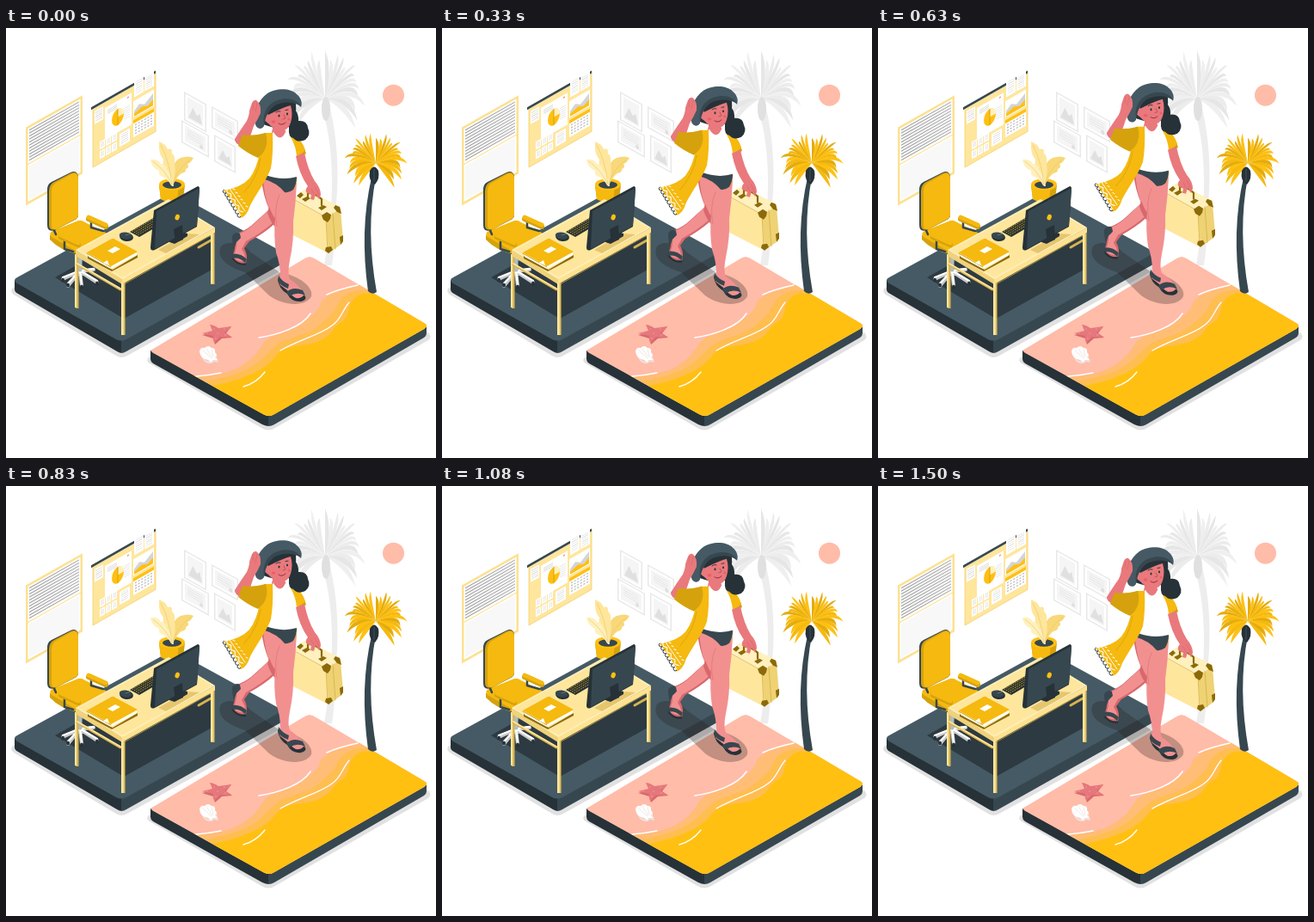
Animation, 500 px wide and 500 px high, one loop 1.54 s. Source, as an HTML page with a canvas:

```html
<!DOCTYPE html>
<html lang="en">
<head>
<meta charset="utf-8">
<title>From the office to the beach</title>
<style>
html, body { margin: 0; width: 100%; height: 100%; overflow: hidden; background: #fff; }
canvas { display: block; width: 500px; height: 500px; }
</style>
</head>
<body>
<canvas id="stage"></canvas>
<script>
const LOOP = 1540, LIFT = 8, SIZE = 500;
const GOLD = '#ffc012', AMBER = '#f5b90f', DEEP = '#d5a20d', PALE = '#ffe69d', CREAM = '#fff0bd', BROWN = '#8b6a0b';
const INK = '#263238', SLATE = '#37474f', STEEL = '#455a64', PEACH = '#ffbca8';
const SKIN = '#e9797c', LEG = '#f29090', SHADE = '#d8686d';

const ratio = window.devicePixelRatio || 1;
const stage = document.getElementById('stage');
const backdrop = document.createElement('canvas');
for (const c of [stage, backdrop]) c.width = c.height = SIZE * ratio;
let g = backdrop.getContext('2d');
g.scale(ratio, ratio);

const fill = (color, d) => { g.fillStyle = color; g.fill(new Path2D(d)); };
const line = (color, width, d) => {
  g.strokeStyle = color;
  g.lineWidth = width;
  g.lineCap = g.lineJoin = 'round';
  g.stroke(new Path2D(d));
};
const oval = (color, x, y, rx, ry = rx, turn = 0) => {
  g.fillStyle = color;
  g.beginPath();
  g.ellipse(x, y, rx, ry, turn, 0, Math.PI * 2);
  g.fill();
};
const box = (color, x, y, w, h) => { g.fillStyle = color; g.fillRect(x, y, w, h); };

// Draws flat artwork on a wall that slants in isometric view.
function onWall(x, y, slope, draw) {
  g.save();
  g.transform(1, slope, 0, 1, x, y);
  draw();
  g.restore();
}

function rows(color, x, y, w, count, gap, h = .6) {
  for (let i = 0; i < count; i++) box(color, x, y + i * gap, w, h);
}

// Arching fronds: each one leaves the crown upwards and bends over to its tip.
function palm(cx, cy, rx, ry, count, tones, from, to) {
  for (let i = 0; i < count; i++) {
    const k = (i * 7 % count) / (count - 1);
    const a = (from + (to - from) * k) * Math.PI / 180;
    const reach = .9 + .12 * Math.sin(i * 5.3);
    const c = Math.cos(a), s = Math.sin(a), side = c < 0 ? -1 : 1;
    const tx = cx + c * rx * reach, ty = cy + s * ry * reach;
    const mx = cx + c * rx * .8, my = cy + s * ry * .6 - Math.abs(c) * ry * .42;
    const w = rx * .2 * side;
    fill(tones[i % tones.length],
      `M${cx} ${cy}Q${mx} ${my} ${tx} ${ty}Q${mx - s * w - c * rx * .12} ${my + c * w} ${cx} ${cy}Z`);
  }
}

function planner() {
  onWall(23, 115.5, -.565, () => {
    box('#fce191', 0, 0, 66, 91);
    box('#fff', 2.5, 3, 61, 85);
    box('#f7f7f7', 4, 5, 58, 36);
    rows('#8f8f8f', 4, 5, 58, 11, 3.5, .9);
    box('#fce191', 2, 44, 62, 1.2);
    box('#f8f8f8', 4, 47, 58, 39);
  });
}

function board() {
  onWall(101, 94, -.57, () => {
    box(PALE, 0, 0, 73, 68);
    line('#f4d06a', .7, 'M0 0V68H73V0');
    box(SLATE, -2, -3, 75, 3.2);
    box('#fff', 2, 4, 10, 15);
    rows('#c6c6c6', 3, 6, 8, 5, 2.4);
    box('#fff', 14, 7, 31, 37);
    rows('#cfcfcf', 17, 11, 11, 3, 2);
    rows('#cfcfcf', 36, 20, 7, 6, 2.5);
    oval(GOLD, 29, 26, 7, 9.5);
    fill(CREAM, 'M29 26L29 16Q36 17 36 26Z');
    line(DEEP, 1, 'M29 17V35');
    box('#fff', 48, -6, 11, 20);
    box('#fff', 60, -5, 11, 19);
    rows('#d2d2d2', 50, -3, 7, 6, 2.6);
    rows('#d2d2d2', 62, -1, 7, 6, 2.4);
    box('#fff', 47, 18, 24, 19);
    fill('#d4d4d4', 'M48 36V30L54 25 60 29 70 22V36Z');
    fill(GOLD, 'M48 36V33L57 30 64 33 70 29V36Z');
    box('#fff', 47, 40, 24, 20);
    box(GOLD, 47, 40, 24, 4);
    for (let i = 0; i < 24; i++) box('#bdbdbd', 49 + i % 6 * 3.6, 46 + (i / 6 | 0) * 3.3, 2, 1.4);
    box('#fff', 31, 47, 12, 15);
    rows('#cfcfcf', 33, 49, 8, 5, 2.4);
    for (let i = 0; i < 6; i++) {
      const x = 8 + i % 3 * 7, y = 43 + (i / 3 | 0) * 11;
      box('#fff', x, y, 6, 9);
      rows('#d6d6d6', x + 1, y + 2, 4, 3, 2);
    }
    oval('#e07b5f', 41, 10, .9);
  });
}

function picture(x, y, w, h, scenic) {
  onWall(x, y, .56, () => {
    box('#e8e8e8', 0, 0, w, h);
    box('#fff', 1.5, 1.5, w - 3, h - 3);
    box('#f5f5f5', 4, 4, w - 8, h - 8);
    if (scenic) fill('#e0e0e0', `M5 ${h - 6}L${w * .4} ${h * .4} ${w * .58} ${h * .6} ${w * .7} ${h * .48} ${w - 5} ${h - 6}Z`);
    else {
      rows('#dedede', 7, 7, w - 14, 4, 2.7);
      oval('#dedede', w * .72, h * .72, 2);
    }
  });
}

function officeFloor() {
  fill('#e1e1e1', 'M8 302Q4 306 9 310L128 381Q134 385 141 381L325 279V265Z');
  fill(INK, 'M10 293V304Q10 307 14 309L129 376Q132 378 135 378V362Z');
  fill(SLATE, 'M134 361V378Q137 378 140 376L318 276Q322 274 322 270V259Z');
  fill(STEEL, 'M13 290L188 194Q194 190 200 194L317 258Q322 261 317 264L140 362Q134 365 128 362L13 297Q7 293 13 290Z');
  fill('#2d3a41', 'M57 290L190 215 241 246V280L137 338Z');
}

function chair() {
  line('#c9c9c9', 4, 'M86 283L66 292M86 283L72 300M86 283L106 296M86 283L102 281M86 283L88 300');
  line('#fff', 2.4, 'M86 282L66 290M86 282L72 297M86 282L106 294M86 282L102 280M86 282L88 298');
  for (const [x, y] of [[66, 293], [72, 299], [106, 297], [88, 301]]) oval(INK, x, y, 2, 2.6);
  line('#b0bec5', 5, 'M86 261V281');
  fill(DEEP, 'M51 241V246Q64 260 85 263L117 246V239Z');
  fill(AMBER, 'M54 236L84 224Q88 223 92 226L116 238Q120 241 115 244L88 258Q84 260 79 258L53 243Q49 239 54 236Z');
  line(SLATE, 2.5, 'M55 233L58 240M99 224V232L113 236M68 248V257L78 260');
  fill(SLATE, 'M48 190Q47 182 53 179L75 168Q82 165 84 172L84 217Q84 221 80 223L57 235Q48 238 48 229Z');
  fill(DEEP, 'M50 190Q50 182 56 179L75 169Q82 166 84 172L84 217Q84 221 80 223L57 234Q50 236 50 229Z');
  fill(AMBER, 'M53 190Q53 183 58 180L76 170Q83 167 84 175L84 216Q84 221 79 223L59 234Q53 236 53 229Z');
  line(DEEP, 6, 'M96 222L116 231');
  line(AMBER, 5, 'M96 220L116 229');
  line(DEEP, 6, 'M64 243L84 252');
  line(AMBER, 5, 'M64 241L84 250');
}

function plant() {
  fill(DEEP, 'M178 183L180 199Q193 207 206 199L208 183Z');
  fill(AMBER, 'M178 183L180 199Q190 204 199 202L201 183Z');
  oval(GOLD, 193, 182, 15, 7);
  oval(SLATE, 193, 182.5, 11, 4.2);
  fill('#f8d879', 'M192 183Q190 157 203 151Q213 148 218 151Q214 158 211 158Q214 162 209 164Q210 168 204 169Q199 172 194 183Z');
  fill(PALE, 'M192 183Q181 163 183 153Q177 147 178 132Q186 135 188 141Q194 139 193 146Q197 148 196 157Q198 168 194 183Z');
  fill(CREAM, 'M193 184Q187 174 180 172Q177 170 178 166Q169 162 168 153Q177 152 180 158Q186 158 187 165Q193 171 195 184Z');
  line('#e9c75e', .6, 'M180 136Q190 155 193 181M214 153Q199 165 194 180M171 155Q186 166 193 182');
}

function desk() {
  box('#d7b350', 81, 263, 3.5, 63);
  box(PALE, 80, 263, 2.2, 62);
  line('#d7b350', 3, 'M83 275L133 304');
  line(PALE, 1.8, 'M83 274L133 303');
  line('#d7b350', 3, 'M224 255L238 247');
  fill('#f0d27a', 'M81 258L135 291V298L81 265Z');
  fill('#ffe28f', 'M135 291L243 232V238L135 298Z');
  line('#d9b44d', .7, 'M137 298L242 239');
  fill(CREAM, 'M81 258L189 199 243 232 135 292Z');
  fill(PALE, 'M84 258L189 201 240 232 135 290Z');
  box('#e1bd59', 134, 296, 4.5, 61);
  box(PALE, 134, 296, 2.6, 61);
  box('#e1bd59', 238, 239, 4.5, 59);
  box(PALE, 238, 239, 2.6, 58);

  fill(BROWN, 'M95 265L124 281 153 264V267L123 283 95 268Z');
  fill('#fff', 'M96 263L122 277 152 261V264L122 280 96 266Z');
  fill(AMBER, 'M94 261L123 245Q125 244 127 246L153 260 122 277Z');
  line(DEEP, 1, 'M94 262L122 278');
  fill('#fff', 'M118 259L127 254 133 257 124 262Z');
  fill('#fff', 'M113 273L118 270 120 276 115 274Z');

  oval(INK, 140, 243, 8, 5, .15);
  oval(SLATE, 139, 241.5, 7.3, 4, .15);
  line('#78909c', .6, 'M139 241L145 239');
  fill(INK, 'M144 237L173 220 184 226 155 243Z');
  for (let r = 0; r < 4; r++) for (let k = 0; k < 10; k++) {
    const x = 147 + k * 2.55 + r * 2.3, y = 236.4 - k * 1.48 + r * 1.32;
    line(DEEP, 1, `M${x} ${y}l.7 -.4`);
  }

  fill('#e5c66f', 'M177 258L210 239 225 240 186 262Z');
  fill(INK, 'M190 246L205 237 211 239V242L196 251 190 249Z');
  fill(INK, 'M172 212L223 184Q225 184 225 187L222 231 173 258Q168 260 168 255Z');
  fill(SLATE, 'M175 213L225 186 222 230 173 257Z');
  fill(INK, 'M195 234L205 229 206 246 197 250Z');
  oval(GOLD, 199.2, 220, 2.6, 3.5, .3);
}

function beach() {
  fill('#e1e1e1', 'M166 383Q162 387 167 390L297 465Q305 470 313 465L491 363Q496 359 491 354Z');
  fill(INK, 'M168 375V385Q168 388 171 390L298 461Q302 463 306 463V450Z');
  fill(SLATE, 'M305 449V463Q309 463 312 461L486 360Q489 358 489 355V345Z');
  const top = 'M171 373L347 268Q353 264 359 268L486 343Q492 346 486 350L312 449Q306 453 299 449L171 378Q166 375 171 373Z';
  g.save();
  g.clip(new Path2D(top));
  fill(PEACH, top);
  fill('#ffbd76', 'M412 298C390 304 374 308 366 319C363 332 352 336 341 346C327 355 307 355 299 367C289 385 271 398 249 402Q236 405 218 404L305 460 500 350Z');
  fill('#ffbe50', 'M425 305C402 303 390 311 385 322C381 333 374 337 364 346C352 356 336 359 320 365C305 375 297 390 276 399Q256 407 232 411L305 460 505 350Z');
  fill(GOLD, 'M441 313C418 304 406 309 400 322C397 331 399 338 388 343C379 349 381 356 366 363C350 372 326 366 314 381C302 398 276 409 240 416L305 460 510 350Z');
  line('#fff', 1.5, 'M409 299Q386 304 373 310M354 332C344 348 315 357 294 360M221 405Q235 404 250 401');
  line('#fff', 1.3, 'M399 319C390 330 389 340 379 346C365 357 342 362 319 375M301 400Q291 413 276 417');
  g.restore();

  fill(SHADE, 'M228 357L241 354 239 348 247 351 262 347 256 355 263 360 251 361 243 368 241 361Z');
  fill('#e5787d', 'M228 355L240 352 237 345Q241 345 247 349L262 347Q260 351 254 354L262 359Q256 360 249 359L242 366Q240 361 241 358Z');
  for (const [x, y] of [[234, 355], [242, 350], [246, 355], [254, 350], [255, 357], [244, 361]]) oval('#f3a3a2', x, y, .7);
  fill('#f0ded8', 'M226 380Q235 393 245 382L247 389 242 388Q236 393 230 387Z');
  fill('#fff', 'M225 376Q226 371 231 372Q235 368 239 372Q244 372 243 377Q247 381 243 383L246 386 240 386 239 389 235 386Q226 385 225 376Z');
  line('#e9d5cf', .6, 'M229 375L239 384M233 373L240 383M239 374L241 382');
}

function drawBackdrop() {
  box('#fff', 0, 0, SIZE, SIZE);
  planner();
  board();
  picture(207, 74, 26, 33, true);
  picture(239, 91, 31, 25, false);
  picture(204, 107, 32, 26, false);
  picture(242, 124, 25, 31, true);
  oval(PEACH, 450.5, 78.2, 12.5);

  fill('#ededed', 'M368 96L377 94Q389 145 384 205 383 250 379 276L370 276Q379 225 379 181 379 130 368 96Z');
  palm(371, 82, 46, 58, 27, ['#ececec', '#e6e6e6', '#efefef'], -218, 38);
  oval('#e0e0e0', 372, 94, 5, 14);
  officeFloor();
  chair();
  plant();
  desk();
  beach();

  fill(SLATE, 'M425 174H430Q418 235 431 307Q426 311 421 306Q411 235 425 174Z');
  palm(430, 157, 36, 37, 29, [GOLD, AMBER, '#e3ac0e'], -232, 52);
  fill(INK, 'M423 166Q428 157 433 166Q435 175 429 182Q421 178 423 166Z');
  line(STEEL, .8, 'M428 164V178');

  fill('rgba(38,28,25,.28)', 'M249 256C253 246 275 249 285 261L318 284C342 288 358 302 355 312C348 325 322 323 306 311L278 284C262 279 245 270 249 256Z');
}

function suitcase() {
  fill(PALE, 'M332 202Q332 198 335 200L371 219Q373 221 373 224L375 262 334 241Q331 240 331 237Z');
  fill('#eed274', 'M372 220L387 208Q389 208 389 211L392 247Q392 250 389 252L375 262Z');
  fill(CREAM, 'M333 200L345 189Q348 187 351 189L387 207Q390 209 387 211L373 221Z');
  line('#d0ac42', .7, 'M380 215L383 257M334 199L372 220 374 260');
  fill(BROWN, 'M367 218L373 214 378 217 377 222 374 226 369 223Z');
  fill(BROWN, 'M383 206L388 208 390 216 385 214 381 209Z');
  fill(BROWN, 'M372 255L378 254 380 258 375 262 371 259Z');
  fill(BROWN, 'M388 243L392 241V248L389 252Z');
  fill(BROWN, 'M338 195L343 191 346 194 342 198Z');
  fill(BROWN, 'M344 199L350 196 354 198 348 202ZM363 209L369 206 373 208 367 212Z');
  line(BROWN, 2.2, 'M351 198V192Q358 191 367 199V206');
}

function legs() {
  fill(SHADE, 'M297 176L320 185Q316 206 313 227Q300 239 283 248L277 256Q282 266 279 273Q268 276 262 267Q267 259 266 249Q263 243 267 239Q276 237 285 230L306 211Q299 195 297 176Z');
  fill(LEG, 'M299 174L321 187Q314 204 312 225Q299 237 279 248L274 257Q280 266 277 271Q269 272 264 266Q269 257 268 247L269 240Q278 237 286 230L306 211Q300 194 299 174Z');
  fill(SLATE, 'M263 242Q267 236 272 239L273 244 268 249 265 257Q263 251 263 242Z');
  line(INK, 2.2, 'M263 267Q268 275 278 275');
  fill(SLATE, 'M262 263Q272 261 280 269L278 273Q271 266 262 268Z');

  fill(SHADE, 'M306 208Q310 218 314 224L315 234Q307 225 304 215Z');
  fill(INK, 'M316 292Q317 303 327 309Q332 319 343 318Q350 316 348 312L319 290Z');
  fill(LEG, 'M303 174L338 180Q337 203 334 225Q335 247 330 270Q327 285 330 292Q342 300 347 309Q345 315 337 314Q331 311 327 305L319 299Q316 295 319 289Q319 275 314 261Q311 242 313 220Q311 202 305 191Z');
  line('#df777b', .8, 'M318 194Q311 210 315 231');
  fill(SLATE, 'M317 288Q321 295 329 298L328 303Q319 300 316 294Z');
  fill(SLATE, 'M326 307Q334 300 345 305L348 311Q338 306 330 312Z');
}

function coatHem() {
  line('#fff', 1, 'M258 184L278 213M254 190L273 218');
  let zig = 'M257 186', dots = '';
  for (let i = 1; i < 9; i++) zig += `L${257 + i * 2.3 - i % 2 * 2.3} ${186 + i * 3.5 + i % 2 * 1.8}`;
  for (let i = 0; i < 6; i++) dots += `M${264 + i * 3} ${187 + i * 4}l2 1`;
  line('#fff', 1.1, zig + dots);
  for (let i = 0; i < 8; i++) {
    g.strokeStyle = INK;
    g.lineWidth = 1;
    g.beginPath();
    g.arc(254.5 + i * 2.4, 190 + i * 4, 2.2, .9, 4.2);
    g.stroke();
  }
}

function torso() {
  fill(DEEP, 'M332 125Q343 127 349 146L338 153Q341 173 335 188L327 180Z');
  fill(SKIN, 'M311 112L323 114 327 126Q319 137 308 126Z');
  fill('#fff', 'M306 125L311 121Q319 134 325 121L334 125Q341 141 340 156L339 174Q323 180 304 174Q308 153 305 139Z');
  fill(SLATE, 'M302 171Q321 178 338 173Q338 181 334 188Q329 192 324 191Q315 180 301 176Z');
  fill(AMBER, 'M333 124Q344 129 348 142Q344 147 338 149Q337 137 331 127Z');
  fill(AMBER, 'M300 122L310 122Q311 146 308 163C303 177 292 191 284 206Q280 219 273 221Q268 207 253 189Q274 185 283 175Q292 163 295 144Z');
  line(DEEP, .8, 'M296 151Q293 173 277 191');
  coatHem();
}

function head() {
  fill(INK, 'M329 90Q341 96 340 108Q350 107 351 116Q355 124 348 130Q339 134 334 128Q328 127 329 117Z');
  fill(INK, 'M299 112Q298 96 311 86L337 86Q339 104 329 115Q318 119 305 114Z');
  fill(SKIN, 'M305 101Q303 97 300 100Q299 108 305 111Q310 117 319 119Q328 120 331 110Q334 100 331 90Q323 92 309 99Z');
  oval('#ef5e67', 311, 109, 2.4, 1.7);
  oval('#ef5e67', 329, 106, 1.5, 1.5);
  oval(INK, 317.5, 102, 1, 1.5);
  oval(INK, 327, 100, 1, 1.4);
  line(INK, .9, 'M314 98Q316 96 319 97M325 95.5L328 95');
  line('#b34b54', .8, 'M323 101L325 105 322 106');
  line('#8e343e', 1, 'M317 111Q321 114 325 110');
  fill(STEEL, 'M290 112C287 98 293 84 304 76C313 70 331 69 338 77C343 81 345 87 343 92C336 85 325 84 315 88C306 92 301 103 300 114C297 119 291 117 290 112Z');
  fill(SLATE, 'M300 113C298 100 303 88 316 84C327 80 339 83 343 91C336 86 325 85 315 89C306 93 301 104 300 113Z');
}

function arms() {
  fill(SKIN, 'M337 149L347 145Q351 165 359 178Q366 186 366 194L364 199 360 193 358 200 354 199 355 194 349 191Q348 187 351 184Q341 170 337 149Z');
  line(SHADE, .7, 'M359 185Q363 190 364 196M355 187L358 193');
  fill(SKIN, 'M285 90Q287 83 291 84Q297 88 296 99Q293 106 288 114L284 126 289 136 275 138Q265 134 266 129Q273 118 280 108Q283 101 283 96Z');
  line(SHADE, .7, 'M288 87L287 95M292 87L290 97');
  fill(DEEP, 'M275 124Q287 126 302 122Q306 135 299 145L293 151Q281 146 270 137Z');
}

function traveller() {
  suitcase();
  legs();
  torso();
  head();
  arms();
}

drawBackdrop();
g = stage.getContext('2d');

function frame() {
  const phase = performance.now() % LOOP / LOOP;
  const lift = LIFT * (1 - Math.cos(phase * Math.PI * 2)) / 2;
  g.setTransform(ratio, 0, 0, ratio, 0, 0);
  g.drawImage(backdrop, 0, 0, SIZE, SIZE);
  g.translate(0, -lift);
  traveller();
  requestAnimationFrame(frame);
}
frame();
</script>
</body>
</html>
```
